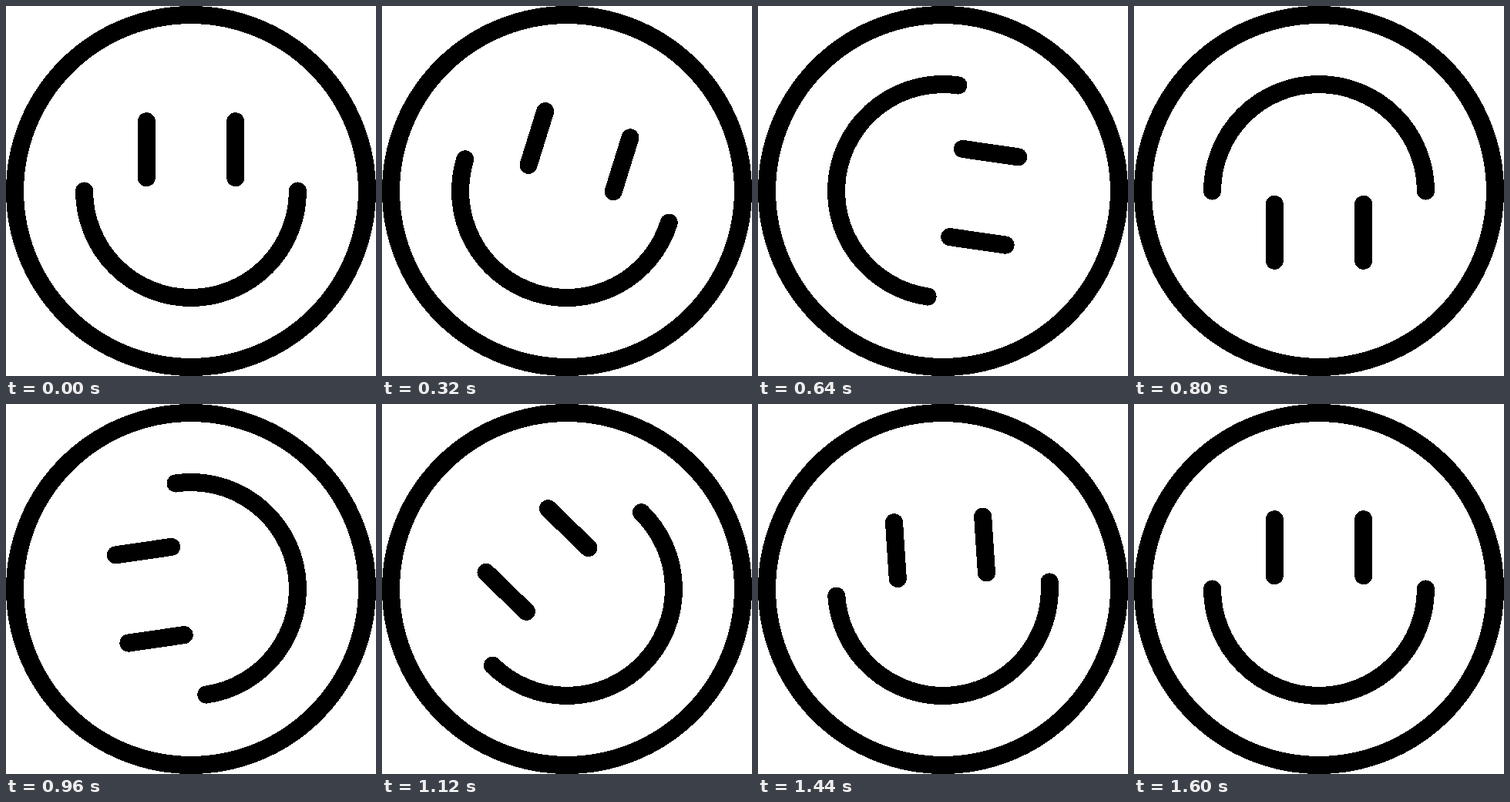
Write an HTML page that moves like this. It is 480x480 px and loops after 2.84 s.

```html
<!DOCTYPE html>
<html lang="en">
<head>
<meta charset="utf-8">
<title>Spinning smile</title>
<style>
html, body { margin: 0; height: 100%; overflow: hidden; background: #fff; }
svg { display: block; width: 100%; height: 100%; }
</style>
</head>
<body>
<svg viewBox="-240 -240 480 480" fill="none" stroke="#000" stroke-width="23.08" stroke-linecap="round" shape-rendering="crispEdges">
  <circle r="228.46"/>
  <path id="face" d="M-57.7-90.3V-17.3M57.7-90.3V-17.3M-138.46 0A138.46 138.46 0 0 0 138.46 0"/>
</svg>
<script>
const LOOP = 2840, SPIN = 1600, STEP = 40;
const face = document.getElementById('face');

// cubic-bezier(.6, 0, .4, 1)
function ease(x) {
  if (x <= 0 || x >= 1) return x <= 0 ? 0 : 1;
  let lo = 0, hi = 1, s;
  for (let i = 0; i < 30; i++) {
    s = (lo + hi) / 2;
    const bx = 1.8 * s * (1 - s) ** 2 + 1.2 * s * s * (1 - s) + s ** 3;
    if (bx < x) lo = s; else hi = s;
  }
  return s * s * (3 - 2 * s);
}

const start = performance.now();
function draw(now) {
  const t = Math.max(0, now - start) % LOOP;
  const stepped = Math.floor(t / STEP) * STEP;
  face.setAttribute('transform', `rotate(${360 * ease(stepped / SPIN)})`);
  requestAnimationFrame(draw);
}
draw(start);
</script>
</body>
</html>
```
